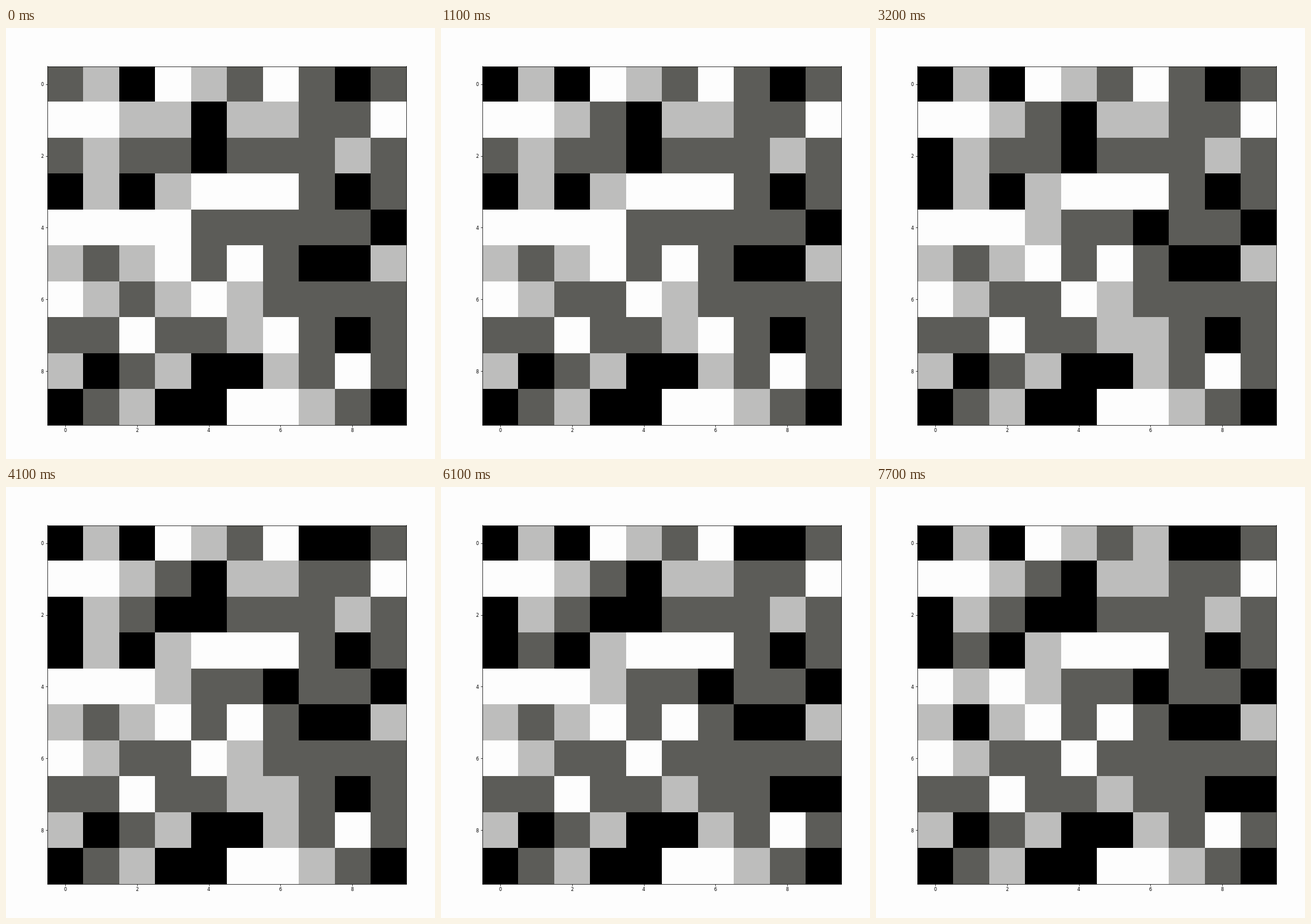
Write a matplotlib script that moves like this. It is 746 by 750 pixels and loops after 8000 ms.

```python
import numpy as np
import matplotlib.pyplot as plt
from matplotlib.animation import FuncAnimation
from matplotlib.colors import ListedColormap

WIDTH, HEIGHT, DPI = 746, 750, 64
PX = 72 / DPI  # points per pixel
STEP_MS, LOOP_MS = 100, 8000
PAPER = "#fdfdfd"
LEVELS = ListedColormap(["#000000", "#5c5c58", "#bdbdbc", PAPER])

ROWS = [
    "1203213101",
    "3322022113",
    "1211011121",
    "0202333101",
    "3333111110",
    "2123131002",
    "3212321111",
    "1131123101",
    "2012002131",
    "0120033210",
]
START = np.array([[int(level) for level in row] for row in ROWS])

# Each event (time in ms, row, column) darkens one cell by one level.
EVENTS = [
    (100, 0, 0), (600, 6, 3), (1100, 1, 3), (1600, 7, 6),
    (2100, 4, 6), (2600, 4, 3), (3100, 2, 0), (3700, 2, 3),
    (4100, 0, 7), (4600, 3, 1), (5100, 7, 9), (5700, 7, 6),
    (6100, 6, 5), (6700, 4, 1), (7100, 5, 1), (7700, 0, 6),
]


def grid_at(ms):
    grid = START.copy()
    for time, row, col in EVENTS:
        if time <= ms:
            grid[row, col] -= 1
    return grid


plt.rcParams["font.family"] = "DejaVu Sans"
fig = plt.figure(figsize=(WIDTH / DPI, HEIGHT / DPI), dpi=DPI, facecolor=PAPER)

left, right, top, bottom = 71.5, 696, 66.5, 690.7
ax = fig.add_axes([left / WIDTH, 1 - bottom / HEIGHT,
                   (right - left) / WIDTH, (bottom - top) / HEIGHT])
image = ax.imshow(START, cmap=LEVELS, vmin=-0.5, vmax=3.5,
                  interpolation="nearest", aspect="auto")
ax.set_xticks(range(0, 10, 2))
ax.set_yticks(range(0, 10, 2))
ax.tick_params(length=2.8 * PX, width=0.8 * PX, pad=2.8 * PX, labelsize=8 * PX)
for spine in ax.spines.values():
    spine.set_linewidth(0.8 * PX)


def update(frame):
    image.set_data(grid_at(frame * STEP_MS))
    return [image]


anim = FuncAnimation(fig, update, frames=LOOP_MS // STEP_MS,
                     interval=STEP_MS, repeat=True, repeat_delay=0)
plt.show()
```
